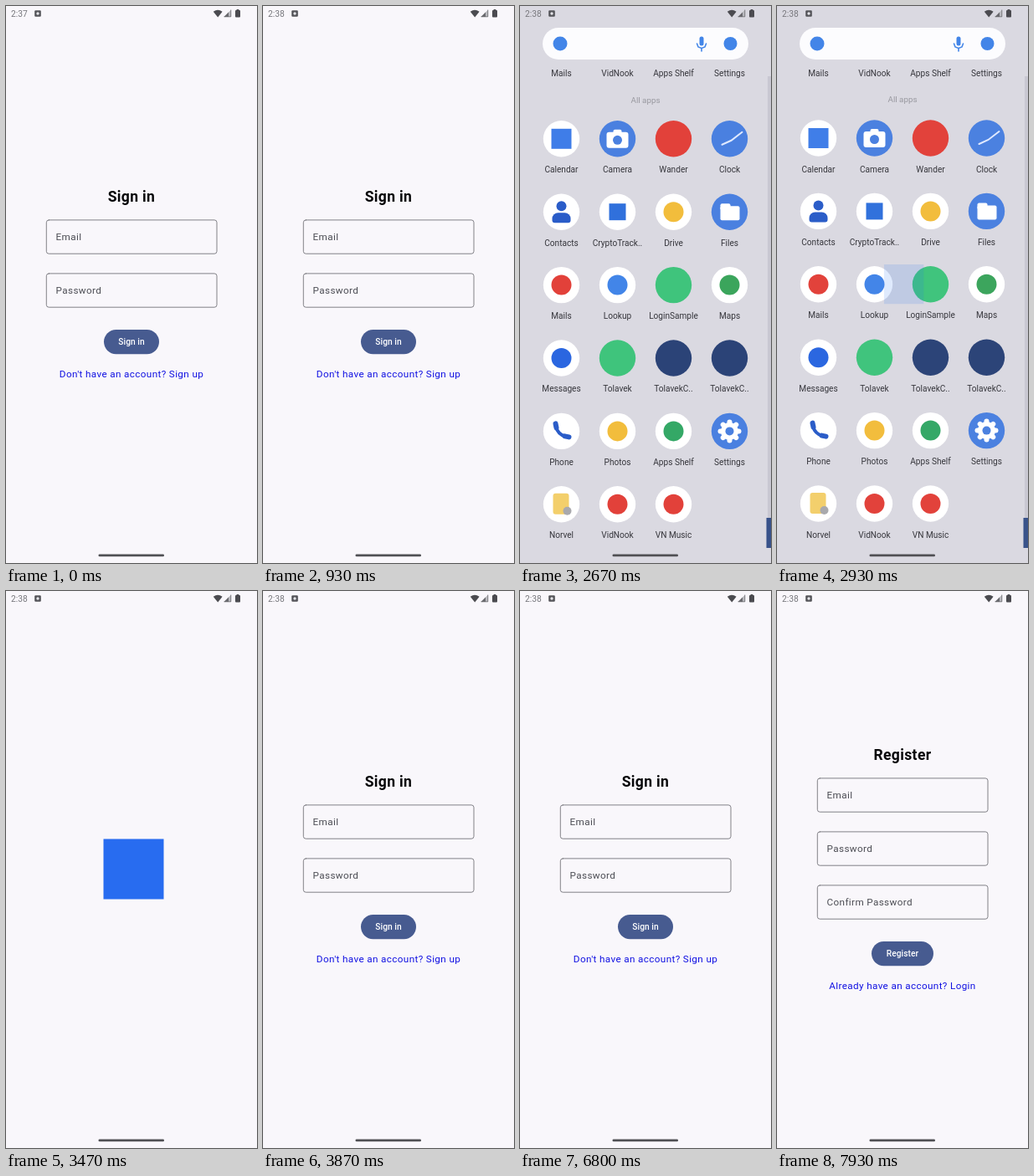
Animation of 300 by 666 pixels, one loop 8000 ms. Source, as an HTML page with a canvas:

```html
<!DOCTYPE html>
<html lang="en">
<head>
<meta charset="utf-8">
<title>Sign in</title>
<style>
  html, body { margin: 0; width: 100%; height: 100%; overflow: hidden; background: #f9f7fb; }
  canvas { display: block; width: 100vw; height: 100vh; }
</style>
</head>
<body>
<canvas id="stage"></canvas>
<script>
const W = 300, H = 666, LOOP = 8000;
const PAPER = '#f9f7fb', SHEET = '#dad9e1', INK = '#4b4b50';
const BLUE = '#4a80e0', LOGO_BLUE = '#286cf0', RED = '#e2413a', GREEN = '#3fc47c', NAVY = '#2b4377', YELLOW = '#f2bd3c';

const canvas = document.getElementById('stage');
const ctx = canvas.getContext('2d');
const dpr = window.devicePixelRatio || 1;
canvas.width = W * dpr;
canvas.height = H * dpr;

const progress = (t, start, end) => Math.min(1, Math.max(0, (t - start) / (end - start)));
const easeOut = p => 1 - (1 - p) ** 3;
const easeInOut = p => p * p * (3 - 2 * p);

function box(x, y, w, h, r, fill, stroke) {
  ctx.beginPath();
  ctx.roundRect(x, y, w, h, r);
  if (fill) { ctx.fillStyle = fill; ctx.fill(); }
  if (stroke) { ctx.strokeStyle = stroke; ctx.lineWidth = 0.9; ctx.stroke(); }
}

function disc(x, y, r, fill) {
  ctx.beginPath();
  ctx.arc(x, y, r, 0, Math.PI * 2);
  ctx.fillStyle = fill;
  ctx.fill();
}

function shape(points, fill) {
  ctx.beginPath();
  points.forEach(([x, y]) => ctx.lineTo(x, y));
  ctx.fillStyle = fill;
  ctx.fill();
}

function line(points, color, width) {
  ctx.beginPath();
  points.forEach(([x, y]) => ctx.lineTo(x, y));
  ctx.strokeStyle = color;
  ctx.lineWidth = width;
  ctx.lineCap = 'round';
  ctx.stroke();
}

function text(str, x, y, size, color, { weight = 400, align = 'center', spacing = 0 } = {}) {
  ctx.font = `${weight} ${size}px Roboto, sans-serif`;
  ctx.letterSpacing = spacing + 'px';
  ctx.textAlign = align;
  ctx.fillStyle = color;
  ctx.fillText(str, x, y);
}

// Runs draw with a translation, a scale and an opacity of its own.
function layer({ x = 0, y = 0, scale = 1, alpha = 1 }, draw) {
  ctx.save();
  ctx.translate(x, y);
  ctx.scale(scale, scale);
  ctx.globalAlpha = alpha;
  draw();
  ctx.restore();
}

// ---- Forms ----

const signIn = {
  title: 'Sign in', top: 228, fields: ['Email', 'Password'],
  buttonWidth: 66, link: "Don't have an account? Sign up"
};
const register = {
  title: 'Register', top: 196, fields: ['Email', 'Password', 'Confirm Password'],
  buttonWidth: 74, link: 'Already have an account? Login'
};

function drawForm({ title, top, fields, buttonWidth, link }) {
  text(title, 150, top + 6.4, 17.5, '#08080a', { weight: 700, spacing: 0.37 });
  fields.forEach((label, i) => {
    const y = top + 27.9 + i * 64;
    box(48.3, y, 203.7, 40.3, 2.9, null, '#74747a');
    text(label, 59.6, y + 24.4, 11.7, '#4b4c53', { align: 'left', spacing: 0.37 });
  });
  const y = top + 31 + fields.length * 64;
  box(150 - buttonWidth / 2, y, buttonWidth, 29.2, 14.6, '#475b90');
  text(title, 150, y + 18.2, 10.2, '#fff', { weight: 500, spacing: 0.07 });
  text(link, 150, y + 56.6, 11.7, '#1212e2', { spacing: 0.37 });
}

function drawSplashMark() {
  box(116.5, 296.5, 72, 72, 0, LOGO_BLUE);
}

// ---- App drawer ----

const mark = color => () => disc(0, 0, 12, color);

const glyphs = {
  camera() {
    box(-5, -11, 10, 6, 2, '#fff');
    box(-13, -8, 26, 19, 3, '#fff');
    disc(0, 1.5, 5.5, BLUE);
  },
  clock() { line([[-9, 7], [2, 2], [15, -8]], '#dfe9ff', 2); },
  person() {
    disc(0, -7, 6, '#2a5cc8');
    box(-11, 1, 22, 12, [7, 7, 3, 3], '#2a5cc8');
  },
  folder() {
    box(-11, -10, 12, 8, 2, '#fff');
    box(-11, -7, 23, 17, 2, '#fff');
  },
  phone() {
    ctx.beginPath();
    ctx.arc(9, -9, 16, Math.PI * 0.58, Math.PI * 0.92);
    ctx.strokeStyle = '#2a5cc8';
    ctx.lineWidth = 4;
    ctx.lineCap = 'round';
    ctx.stroke();
    line([[-7, -9], [-6, -4]], '#2a5cc8', 6);
    line([[4, 6], [9, 7]], '#2a5cc8', 6);
  },
  gear() {
    for (let i = 0; i < 8; i++) {
      const a = i * Math.PI / 4;
      line([[0, 0], [11 * Math.cos(a), 11 * Math.sin(a)]], '#fff', 6);
    }
    disc(0, 0, 10.5, '#fff');
    disc(0, 0, 5, BLUE);
  },
  sim() {
    box(-10, -13, 19, 25, 3, '#f3cf6b');
    disc(7, 8, 5, '#a9a9ad');
  }
};

const apps = [
  ['Calendar', '#fff', () => box(-12, -12, 24, 24, 0, '#3f7de8')],
  ['Camera', BLUE, glyphs.camera],
  ['Wander', RED],
  ['Clock', BLUE, glyphs.clock],
  ['Contacts', '#fff', glyphs.person],
  ['CryptoTrack..', '#fff', () => box(-10, -10, 20, 20, 0, '#3070dc')],
  ['Drive', '#fff', mark(YELLOW)],
  ['Files', BLUE, glyphs.folder],
  ['Mails', '#fff', mark(RED)],
  ['Lookup', '#fff', mark('#4285e8')],
  ['LoginSample', GREEN],
  ['Maps', '#fff', mark('#3ba55c')],
  ['Messages', '#fff', mark('#2a66e0')],
  ['Tolavek', GREEN],
  ['TolavekC..', NAVY],
  ['TolavekC..', NAVY],
  ['Phone', '#fff', glyphs.phone],
  ['Photos', '#fff', mark(YELLOW)],
  ['Apps Shelf', '#fff', mark('#34a866')],
  ['Settings', BLUE, glyphs.gear],
  ['Norvel', '#fff', glyphs.sim],
  ['VidNook', '#fff', mark(RED)],
  ['VN Music', '#fff', mark(RED)]
];
const suggested = ['Mails', 'VidNook', 'Apps Shelf', 'Settings']
  .map(name => apps.find(app => app[0] === name));

function drawApp([label, background, glyph], column, y) {
  layer({ x: 49.5 + column * 67, y }, () => {
    disc(0, 0, 21.7, background);
    if (glyph) glyph();
    text(label, 0, 40.5, 10.1, '#36363c');
  });
}

function drawSearchBar() {
  box(27, 26, 246, 38, 19, '#fcfcfe');
  disc(48, 45, 8.5, '#4285e8');
  box(214.5, 36.5, 5, 11, 2.5, '#4285e8');
  line([[211.5, 45], [213, 49], [217, 50.5], [221, 49], [222.5, 45]], '#4285e8', 1.6);
  line([[217, 51], [217, 54]], '#4285e8', 1.6);
  disc(251.5, 45, 8, '#4285e8');
}

function drawDrawer(scroll) {
  box(0, 0, W, H, 0, SHEET);
  ctx.save();
  ctx.beginPath();
  ctx.rect(0, 71, W, H);
  ctx.clip();
  ctx.translate(0, scroll);
  suggested.forEach((app, i) => drawApp(app, i, 43));
  text('All apps', 150, 115, 9.8, '#98989f');
  apps.forEach((app, i) => drawApp(app, i % 4, 158 + Math.floor(i / 4) * 87.4));
  ctx.restore();
  drawSearchBar();
  box(296, 84, 4, 528, 0, '#c9c8d2');
  box(294.5, 612, 6, 36, 0, '#38528a');
}

// ---- System bars ----

function drawSystemBars(t) {
  text(t < 930 ? '2:37' : '2:38', 6, 12.8, 10.2, '#77777c', { align: 'left' });
  box(34.2, 5.2, 7.6, 7.6, 1.2, '#55555a');
  disc(38, 9, 1.7, '#e4e4e8');

  ctx.beginPath();
  ctx.moveTo(253.2, 13.4);
  ctx.lineTo(247.8, 6.8);
  ctx.quadraticCurveTo(253.2, 2.6, 258.6, 6.8);
  ctx.fillStyle = INK;
  ctx.fill();

  shape([[260.5, 13], [269, 13], [269, 4.6]], '#b9b9be');
  shape([[260.5, 13], [266, 13], [266, 7.6]], '#6a6a6f');
  line([[260.8, 12.8], [268.8, 12.8], [268.8, 5]], '#6a6a6f', 0.8);

  box(275.6, 4, 2.8, 2, 0.4, INK);
  box(274, 5, 6, 8.4, 1, INK);
  box(110.5, 655.6, 78.5, 2.7, 1.35, '#505054');
}

// ---- Timeline ----

function drawLeavingApp(t) {
  const p = easeInOut(progress(t, 2010, 2230));
  const scale = 1 - 0.6 * p;
  layer({ x: 150 * (1 - scale), y: 250 * (1 - scale), scale, alpha: 1 - p * p }, () => {
    box(0, 0, W, H, 24 * p, PAPER);
    drawForm(signIn);
  });
}

// The mark grows first; the paper behind it follows.
function drawLaunch(t) {
  const p = progress(t, 2880, 3230);
  const scale = 0.6 + 0.4 * p;
  layer({ alpha: p ** 3 }, () => box(0, 0, W, H, 0, PAPER));
  layer({ x: 150 * (1 - scale), y: 333 * (1 - scale), scale, alpha: p }, drawSplashMark);
}

function draw(t) {
  ctx.setTransform(dpr, 0, 0, dpr, 0, 0);
  box(0, 0, W, H, 0, PAPER);

  if (t < 2010) {
    drawForm(signIn);
  } else if (t < 3230) {
    box(0, 0, W, H, 0, SHEET);
    const rise = easeOut(progress(t, 2200, 2470));
    const scroll = 67 * (1 - easeOut(progress(t, 2470, 2730)));
    if (rise > 0) layer({ y: H * (1 - rise) }, () => drawDrawer(scroll));
    if (t < 2230) drawLeavingApp(t);
    if (t > 2880) drawLaunch(t);
  } else if (t < 3850) {
    const p = progress(t, 3690, 3850);
    layer({ alpha: 1 - p }, drawSplashMark);
    layer({ alpha: p }, () => drawForm(signIn));
  } else {
    const p = easeInOut(progress(t, 7130, 7830));
    layer({ alpha: 1 - p }, () => drawForm(signIn));
    layer({ alpha: p }, () => drawForm(register));
  }
  drawSystemBars(t);
}

const start = performance.now();
function tick() {
  draw((performance.now() - start) % LOOP);
  requestAnimationFrame(tick);
}
tick();
</script>
</body>
</html>
```
